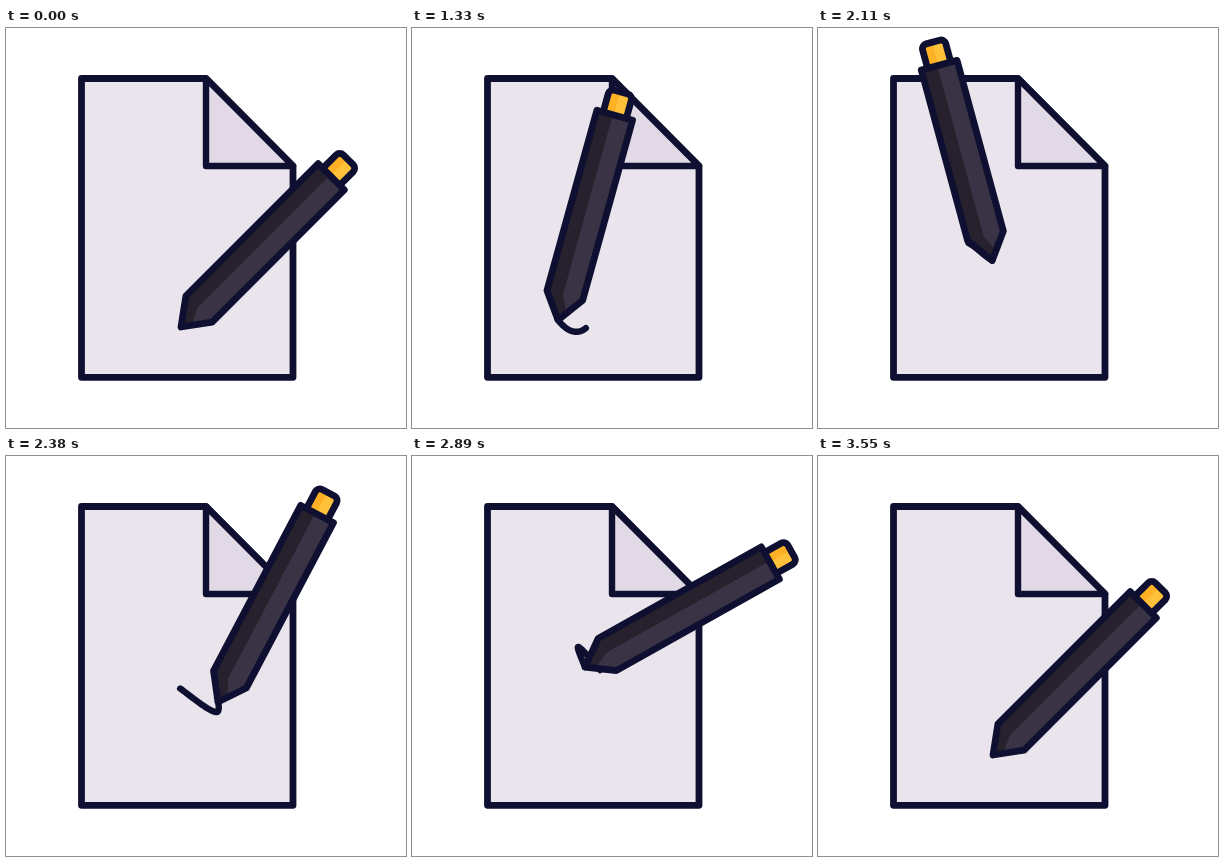
Recreate the animation shown at these times as an HTML page with a canvas. Size 400 px wide and 400 px high, loop 3.58 s.

```html
<!DOCTYPE html>
<html lang="en">
<head>
<meta charset="utf-8">
<title>Pen writing on a page</title>
<style>
  html, body { margin: 0; width: 100%; height: 100%; overflow: hidden; background: #fff; }
  canvas { display: block; width: 400px; height: 400px; }
</style>
</head>
<body>
<canvas id="stage" width="400" height="400"></canvas>
<script>
const ctx = document.getElementById('stage').getContext('2d');

const LOOP = 3580;
const STEP = 30;
const INK = { start: 1000, end: 3150, life: 270 };
const COLOR = {
  line: '#0f1031', page: '#eae5ec', fold: '#e1d9e6',
  body: '#26212c', bodyLight: '#393345', cap: '#ffb126', capLight: '#ffc13a'
};

// Where the pen tip passes: time, x, y
const PATH = [
  [1000, 175, 299],
  [1330, 146, 292],
  [1530, 102.5, 218],
  [1640, 114, 203],
  [1810, 147, 213.5],
  [2095, 172, 231],
  [2310, 211, 256],
  [2380, 212, 246],
  [2620, 188, 214],
  [2780, 166, 191],
  [2890, 173, 211],
  [3150, 181, 224],
  [3550, 175, 299]
];

// How the pen leans: time, degrees
const TILT = [[990, 45], [1810, -37.3], [2095, -17], [2380, 27.8], [2890, 60.7], [3550, 45]];

const smooth = (a, b, t) => {
  const p = Math.min(1, Math.max(0, (t - a) / (b - a)));
  return p * p * (3 - 2 * p);
};

// Smooth curve through the keys, at rest at both ends.
function sample(keys, t, column = 1) {
  const last = keys.length - 1;
  if (t <= keys[0][0]) return keys[0][column];
  if (t >= keys[last][0]) return keys[last][column];

  const slope = i => (keys[i + 1][column] - keys[i][column]) / (keys[i + 1][0] - keys[i][0]);
  const tangent = i => i === 0 || i === last ? 0 : (slope(i - 1) + slope(i)) / 2;

  const i = keys.findIndex(key => key[0] > t) - 1;
  const [a, b] = [keys[i], keys[i + 1]];
  const span = b[0] - a[0];
  const p = (t - a[0]) / span, q = 1 - p;
  return a[column] + (b[column] - a[column]) * smooth(0, 1, p)
    + span * p * q * (tangent(i) * q - tangent(i + 1) * p);
}

const tip = t => [sample(PATH, t, 1), sample(PATH, t, 2)];

function trace(points) {
  ctx.beginPath();
  points.forEach(([x, y]) => ctx.lineTo(x, y));
  ctx.closePath();
}

function fill(color) {
  ctx.fillStyle = color;
  ctx.fill();
}

function outline(width) {
  ctx.lineWidth = width;
  ctx.stroke();
}

function drawPage() {
  trace([[75.5, 50.5], [200, 50.5], [287, 138], [287, 349.3], [75.5, 349.3]]);
  fill(COLOR.page);
  outline(6.8);
  trace([[200, 50.5], [287, 138], [200, 138]]);
  fill(COLOR.fold);
  outline(6.4);
}

function drawInk(t) {
  const from = Math.max(INK.start, t - INK.life);
  const to = Math.min(t, INK.end);
  if (to <= from) return;
  ctx.beginPath();
  for (let i = 0; i <= 70; i++) ctx.lineTo(...tip(from + (to - from) * i / 70));
  outline(6.4);
}

function drawPen(t) {
  const length = 187 - 22 * (smooth(1330, 1540, t) - smooth(1810, 2380, t));
  const half = 18.5, neck = -25.5, top = neck - length;
  const body = [[0, 0], [-half, neck], [-half, top], [half, top], [half, neck]];

  ctx.save();
  ctx.translate(...tip(t));
  ctx.rotate(sample(TILT, t) * Math.PI / 180);

  ctx.beginPath();
  ctx.roundRect(-12, top - 24, 24, 30, [5, 5, 0, 0]);
  fill(COLOR.cap);
  ctx.fillStyle = COLOR.capLight;
  ctx.fillRect(-1, top - 23, 11, 27);
  outline(6.8);

  trace(body);
  fill(COLOR.body);
  trace([[-2, neck], [5, -11], [half, neck], [half, top], [-2, top]]);
  fill(COLOR.bodyLight);
  trace(body);
  outline(6.8);
  ctx.restore();
}

function draw(t) {
  ctx.fillStyle = '#fff';
  ctx.fillRect(0, 0, 400, 400);
  ctx.strokeStyle = COLOR.line;
  ctx.lineJoin = ctx.lineCap = 'round';
  drawPage();
  drawInk(t);
  drawPen(t);
}

const origin = performance.now();
function tick() {
  const t = (performance.now() - origin) % LOOP;
  draw(Math.floor((t + 25) / STEP) * STEP - 20);
  requestAnimationFrame(tick);
}
tick();
</script>
</body>
</html>
```
